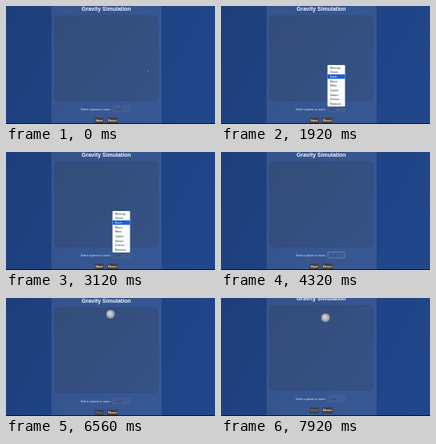
An HTML page with a canvas for the animation above (8000 ms loop, 262 by 148 pixels).

```html
<!DOCTYPE html>
<html lang="en">
<head>
<meta charset="utf-8">
<title>Gravity Simulation</title>
<style>
  html, body { margin: 0; width: 100%; height: 100%; overflow: hidden; background: #1e3c72; }
  canvas { display: block; width: 262px; height: 148px; }
</style>
</head>
<body>
<canvas id="stage"></canvas>
<script>
const W = 262, H = 148, LOOP = 8000;
const OPEN = 1200, CLOSE = 3600, LAUNCH = 5360;
const FALL_START = 5300, FALL_RATE = 1.41;
const PLANETS = ['Mercury', 'Venus', 'Earth', 'Moon', 'Mars', 'Jupiter', 'Saturn', 'Uranus', 'Neptune'];
// Pointer path: time, x, y
const PATH = [[0, 177, 80], [80, 177, 80], [900, 146, 129], [2400, 146, 129], [2900, 142, 88],
  [3600, 142, 88], [4240, 116, 144], [8000, 116, 144]];

const canvas = document.getElementById('stage');
const scale = window.devicePixelRatio || 1;
canvas.width = W * scale;
canvas.height = H * scale;
const ctx = canvas.getContext('2d');

const clamp = v => Math.max(0, Math.min(1, v));
const ease = v => v * v * (3 - 2 * v);

function gradient(x0, y0, x1, y1, ...colors) {
  const g = ctx.createLinearGradient(x0, y0, x1, y1);
  colors.forEach((c, i) => g.addColorStop(i / (colors.length - 1), c));
  return g;
}

function box(x, y, w, h, r, fill, stroke) {
  ctx.beginPath();
  ctx.roundRect(x, y, w, h, r);
  ctx.fillStyle = fill;
  ctx.fill();
  if (!stroke) return;
  ctx.strokeStyle = stroke;
  ctx.lineWidth = 0.6;
  ctx.stroke();
}

function text(str, x, y, size, color, { bold = false, align = 'left' } = {}) {
  ctx.font = `${bold ? 'bold ' : ''}${size}px "Liberation Sans", sans-serif`;
  ctx.textAlign = align;
  ctx.fillStyle = color;
  ctx.fillText(str, x, y);
}

function button(label, x, w, disabled) {
  box(x, 140, w, 8, 1.2, disabled ? '#3b424f' : '#453f40');
  text(label, x + w / 2, 145.3, 4, disabled ? '#77777a' : '#f2ece4', { bold: true, align: 'center' });
}

function drawBall(y) {
  const g = ctx.createRadialGradient(130, y - 1, 0.5, 131, y, 5.8);
  g.addColorStop(0, '#d9dcdc');
  g.addColorStop(0.5, '#b4b8ba');
  g.addColorStop(1, '#7d868f');
  ctx.fillStyle = g;
  ctx.beginPath();
  ctx.arc(131, y, 5.5, 0, Math.PI * 2);
  ctx.fill();
}

function drawMenu() {
  const pitch = 5.65;
  box(133.5, 74, 22, 52, 1, '#fbfcfd');
  PLANETS.forEach((name, i) => {
    const y = 74.6 + i * pitch, chosen = name === 'Earth';
    if (chosen) box(133.5, y - 0.2, 22, pitch, 0, '#1760d0');
    text(name, 136.8, y + 4, 3.6, chosen ? '#ffffff' : '#30343a');
  });
}

function drawPointer(t) {
  const i = PATH.findIndex((p, n) => n && t <= p[0]);
  const [t0, x0, y0] = PATH[i - 1], [t1, x1, y1] = PATH[i];
  const k = ease((t - t0) / (t1 - t0));
  ctx.save();
  ctx.translate(x0 + (x1 - x0) * k, y0 + (y1 - y0) * k);
  ctx.beginPath();
  ctx.moveTo(0, 0);
  ctx.lineTo(0, 2.5);
  ctx.lineTo(0.7, 2);
  ctx.lineTo(1.9, 1.9);
  ctx.closePath();
  ctx.fillStyle = '#e8edf2';
  ctx.strokeStyle = '#18243a';
  ctx.lineWidth = 0.4;
  ctx.fill();
  ctx.stroke();
  ctx.restore();
}

function draw(t) {
  const launched = t >= LAUNCH, open = t >= OPEN && t < CLOSE;
  const focused = t >= CLOSE && t < LAUNCH;
  ctx.setTransform(scale, 0, 0, scale, 0, 0);
  ctx.fillStyle = gradient(0, 0, W, H, '#1d3e7a', '#1f4384', '#21478b');
  ctx.fillRect(0, 0, W, H);
  ctx.fillStyle = 'rgba(255,255,255,0.1)';
  ctx.fillRect(57, 0, 138, H);

  ctx.save();
  ctx.translate(0, -3 * ease(clamp((t - 7560) / 280)));
  text('Gravity Simulation', 125.7, 6, 7, '#f4f7fb', { bold: true, align: 'center' });
  box(61.3, 12.3, 128.4, 106.4, 4, gradient(61, 12, 190, 119, '#334d7a', '#344f7f', '#365286'), '#2c4877');
  if (launched) drawBall(18 + FALL_RATE * ((t - FALL_START) / 1000) ** 2);

  text('Select a planet or moon:', 93.5, 130.6, 3.5, '#e6ecf4');
  box(133.8, 125.3, 21.6, 7.6, 1, '#415d90', focused ? '#8497b8' : '#4a6597');
  text('Earth', 136.5, 130.6, 3.6, '#27416f');
  button('Start', 111, 11.5, launched);
  button('Reset', 126.8, 13.2, false);
  ctx.restore();

  if (open) drawMenu();
  if (!launched) drawPointer(t);
  ctx.fillStyle = '#0b1424';
  ctx.fillRect(0, 147, W, 1);
}

function tick(now) {
  draw(now % LOOP);
  requestAnimationFrame(tick);
}
draw(0);
requestAnimationFrame(tick);
</script>
</body>
</html>
```
